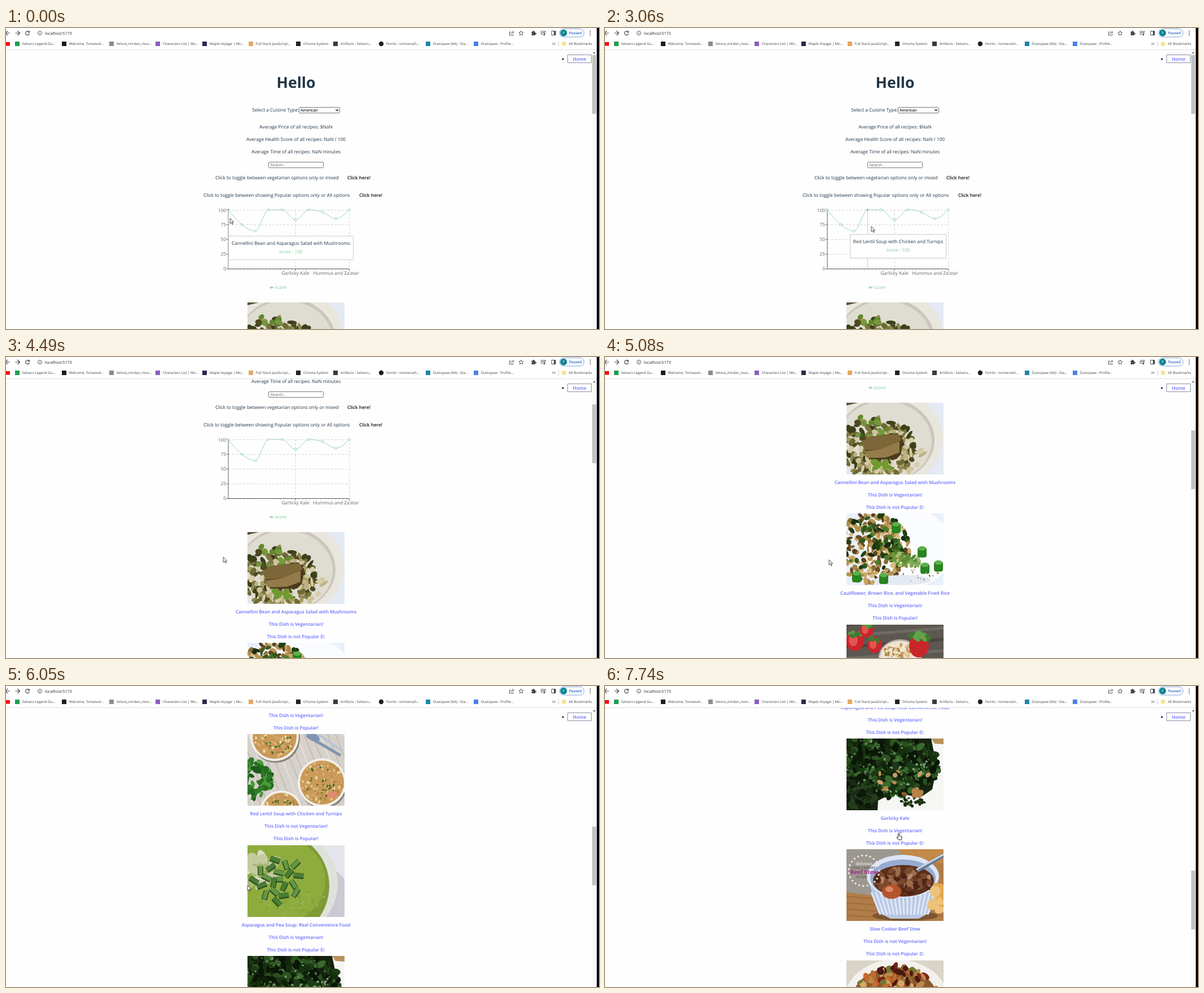
Recreate the animation shown at these times as an HTML page with a canvas. Size 1051x533 px, loop 8000 ms.

```html
<!DOCTYPE html>
<html lang="en">
<head>
<meta charset="utf-8">
<title>Recipes</title>
<style>
html, body { margin: 0; width: 100%; height: 100%; overflow: hidden; background: #fefefe; }
canvas { display: block; }
</style>
</head>
<body>
<canvas id="stage" width="1051" height="533"></canvas>
<script>
const screen2d = document.getElementById('stage').getContext('2d');
let g = screen2d;

const INK = '#213547', LINK = '#646cff', GREEN = '#82ca9d', GREY = '#666', DARK = '#45494d';
const SANS = '"Open Sans", "Noto Sans", sans-serif', ARIAL = '"Liberation Sans", sans-serif';
const LOOP = 8000, MID = 514, TOP = 486, PITCH = 196.4;

// ---------- drawing helpers ----------
function label(str, x, y, color = INK, align = 'center', size = 8.3, weight = 400, face = SANS) {
  g.textRendering = 'geometricPrecision';
  g.font = `${weight} ${size}px ${face}`;
  g.textAlign = align;
  g.fillStyle = color;
  g.fillText(str, x, y + size * .36);
}
function rect(x, y, w, h, fill, stroke, radius = 0) {
  g.beginPath();
  g.roundRect(x, y, w, h, radius);
  if (fill) { g.fillStyle = fill; g.fill(); }
  if (stroke) { g.strokeStyle = stroke; g.lineWidth = 1; g.stroke(); }
}
function line(color, width, ...p) {
  g.beginPath();
  for (let i = 0; i < p.length; i += 2) g.lineTo(p[i], p[i + 1]);
  g.strokeStyle = color; g.lineWidth = width; g.stroke();
}
function poly(color, ...p) {
  g.beginPath();
  for (let i = 0; i < p.length; i += 2) g.lineTo(p[i], p[i + 1]);
  g.fillStyle = color; g.fill();
}
function oval(color, x, y, rx, ry = rx, turn = 0) {
  g.beginPath();
  g.ellipse(x, y, rx, ry, turn, 0, 7);
  g.fillStyle = color; g.fill();
}
function shape(d, x, y, fill, stroke, width = 1) {
  const path = new Path2D(d);
  g.save();
  g.translate(x, y);
  if (fill) { g.fillStyle = fill; g.fill(path); }
  if (stroke) { g.strokeStyle = stroke; g.lineWidth = width; g.stroke(path); }
  g.restore();
}

// ---------- dish pictures ----------
let seed = 1;
const rand = () => (seed = seed * 16807 % 2147483647) / 2147483647;
function scatter(n, x, y, rx, ry, size, ...colors) {
  while (n--) {
    const a = rand() * 7, r = Math.sqrt(rand());
    oval(colors[Math.floor(rand() * colors.length)], x + Math.cos(a) * rx * r, y + Math.sin(a) * ry * r,
      size * (.5 + rand() * .6), size * (.3 + rand() * .4), rand() * 3);
  }
}
function soup(x, y, r) {
  oval('#8b857c', x + 2, y + 3, r);
  oval('#f2f0ec', x, y, r);
  oval('#c99a58', x, y, r - 4);
  scatter(90, x, y, r - 6, r - 6, 3.5, '#dcb67c', '#b98545', '#ead2a4', '#d2a566');
  scatter(28, x, y, r - 12, r - 12, 2.5, '#4f7a2a', '#35601f');
}
const photos = [
  () => {
    rect(0, 0, 172, 127, '#e3eaf3');
    oval('#e9e6de', 75, 62, 96, 86);
    oval('#cbc7bc', 70, 66, 86, 74);
    oval('#dfdcd2', 68, 68, 83, 71);
    poly('#5a5038', 0, 0, 20, 0, 0, 5);
    scatter(210, 56, 80, 66, 54, 8, '#6f6a35', '#8f8850', '#4d4a22', '#a59c60', '#3c4018', '#7d7540');
    scatter(50, 72, 88, 66, 42, 8, '#cfc499', '#bdb284', '#d8cda6');
    scatter(16, 40, 48, 32, 26, 8, '#5f8a2a', '#3f5c1c', '#73983a');
    scatter(5, 58, 113, 18, 8, 10, '#6f9a30');
    poly('#4a3a1c', 28, 74, 42, 60, 90, 54, 101, 66, 96, 92, 88, 100, 40, 100);
    poly('#7d6738', 26, 70, 40, 60, 92, 55, 98, 66, 60, 82, 32, 84);
    poly('#947b49', 32, 86, 60, 82, 94, 68, 94, 88, 70, 97, 36, 98);
  },
  () => {
    rect(0, 0, 172, 127, '#e9f0fa');
    oval('#fafcff', 110, 62, 78, 70);
    scatter(260, 46, 62, 66, 62, 7, '#8a6a35', '#a8854a', '#c9a566', '#6b4d22', '#b5924f', '#5a4220', '#d9bd84');
    scatter(70, 50, 50, 62, 52, 7, '#2f5a1c', '#1e3f12', '#4a7d2a', '#173010');
    scatter(26, 95, 80, 16, 12, 6, '#6f9a3c', '#a6bd6a', '#557f2c');
    oval('#e4e9f2', 100, 118, 50, 9);
    scatter(18, 115, 87, 15, 11, 7, '#5d8c3a', '#9dbf70', '#79a850');
    for (const [x, y] of [[66, 115], [139, 97], [163, 93], [88, 25], [134, 68], [18, 112]]) {
      rect(x - 8, y - 8, 16, 18, '#2a8420', null, 4);
      oval('#5cb04a', x, y - 6, 7, 4);
    }
    scatter(14, 130, 110, 35, 12, 2, '#8a6a45', '#b49a72');
  },
  () => {
    rect(0, 0, 172, 127, '#5c5751');
    for (let i = 0; i < 8; i++) line(i % 2 ? '#6f6a63' : '#4a4540', 5, 0, i * 20, 172, i * 20 - 14);
    for (const [x, y, r] of [[15, 29, 16], [36, 10, 12], [50, 36, 13], [128, 38, 18]]) {
      oval('#c8262b', x, y, r, r * 1.1);
      oval('#e5534f', x - 3, y - 2, r * .5, r * .7);
      scatter(8, x, y - r * .8, r * .7, 4, 6, '#3f7a30', '#5b9a45');
    }
    oval('#b8b2a8', 95, 58, 38, 32);
    rect(58, 55, 74, 80, '#e6d8cf');
    oval('#efe6d8', 95, 56, 35, 27);
    scatter(80, 95, 48, 28, 15, 4, '#c99d5c', '#e0c08a', '#a87a3c', '#f0ddb8');
    scatter(26, 140, 95, 30, 25, 3, '#c9a470', '#a88450');
    oval('#c8262b', 128, 38, 17, 20);
    scatter(12, 128, 21, 17, 6, 9, '#3f7a30', '#63a24a');
  },
  () => {
    rect(0, 0, 172, 127, '#d6d1ca');
    for (let i = 0; i < 16; i++) line(i % 3 ? '#c4beb5' : '#e6e2dc', 2, i * 14 - 40, 0, i * 14 + 10, 127);
    line('#8295ae', 5, 105, 3, 165, 38);
    line('#b7c5d8', 4, 125, 0, 168, 30);
    oval('#7f93b0', 116, 5, 13, 7, .5);
    soup(48, 5, 43);
    soup(132, 86, 43);
    soup(60, 138, 38);
    scatter(80, 12, 78, 32, 34, 8, '#2f7a28', '#1d5a1a', '#479a38', '#246b20');
    oval('#e08a70', 150, 108, 9, 6);
  },
  () => {
    rect(0, 0, 172, 127, '#c9cad2');
    poly('#e4e5ec', 118, 0, 172, 0, 172, 60, 152, 40);
    oval('#dfe2da', 52, 68, 108, 100);
    oval('#7f9a38', 45, 72, 100, 98);
    oval('#8eac3e', 50, 62, 88, 78);
    scatter(24, 24, 48, 30, 30, 15, '#c4cba0', '#a9b874', '#d8dcc4');
    scatter(60, 80, 95, 60, 28, 3, '#82a035', '#98b550');
    for (let i = 0; i < 20; i++) {
      const a = i * 2.4, r = 9 * Math.sqrt(i), x = 54 + Math.cos(a) * r * 1.15, y = 60 + Math.sin(a) * r;
      const dx = 9 * Math.cos(i * 1.7), dy = 8 * Math.sin(i * 1.7);
      line('#2c5220', 10, x - dx, y - dy + 1, x + dx, y + dy + 1);
      line(i % 2 ? '#4b7d34' : '#639646', 7, x - dx, y - dy, x + dx, y + dy);
    }
  },
  () => {
    rect(0, 0, 172, 127, '#f6f6f4');
    poly('#b8925c', 150, 0, 172, 0, 172, 10, 156, 9);
    poly('#16240f', 0, 0, 150, 0, 160, 50, 152, 90, 130, 105, 85, 95, 56, 110, 55, 127, 0, 127);
    scatter(380, 70, 46, 92, 58, 9, '#1c3a16', '#0f2009', '#2b5220', '#16300f', '#3b6a2e', '#0a1607');
    scatter(90, 20, 95, 32, 30, 8, '#1a2c14', '#0d170a', '#24401c');
    scatter(70, 70, 45, 85, 50, 3, '#5f8a55', '#4b7544', '#7d9f78');
    scatter(10, 100, 75, 55, 20, 6, '#b98a4e', '#caa06a');
    scatter(9, 114, 98, 20, 6, 9, '#b5824a', '#d2a875', '#8a5a2c');
    scatter(30, 115, 112, 22, 8, 4, '#2b4a20', '#18300f');
  },
  () => {
    rect(0, 0, 172, 127, '#b07c48');
    poly('#9c9791', 0, 0, 172, 0, 172, 14, 90, 26, 60, 84, 0, 76);
    poly('#c48a48', 90, 0, 172, 0, 172, 24, 120, 26);
    for (let i = 0; i < 5; i++) line('#9a6737', 1.5, 0, 84 + i * 11, 172, 96 + i * 11);
    oval('#7c5630', 104, 118, 58, 9);
    poly('#b9c8e4', 36, 46, 164, 46, 148, 112, 128, 123, 78, 123, 56, 112);
    for (let i = 0; i < 15; i++) line('#dfe8f6', 3, 44 + i * 8, 76, 60 + i * 6, 116);
    oval('#dde6f5', 100, 48, 64, 38);
    oval('#97abd0', 100, 51, 58, 33);
    oval('#5c2f1a', 101, 56, 54, 28);
    scatter(70, 101, 57, 47, 22, 9, '#7a4a30', '#9c6a4c', '#4b2415', '#b58668', '#6a3520');
    oval('#b5532c', 80, 75, 17, 13);
    oval('#d98a62', 76, 71, 7, 5);
    line('#6a7a94', 7, 125, 38, 174, 10);
    line('#cfdaeb', 3, 124, 36, 174, 8);
    scatter(14, 165, 85, 12, 18, 14, '#e0a850', '#eec27a');
    for (let a = 0; a < 6.2; a += .27) oval('#f0ead8', 31 + 27 * Math.cos(a), 38 + 27 * Math.sin(a), 1.7);
    label('delicious', 31, 25, '#fff', 'center', 7, 'italic 400', '"Noto Serif", serif');
    label('slow cooker', 30, 32, '#55504c', 'center', 7.8);
    label('Beef Stew', 31, 40, '#a0207e', 'center', 10, 700, '"Noto Serif", serif');
    label('recipe', 27, 48, '#55504c', 'center', 7);
  },
  () => {
    rect(0, 0, 172, 127, '#d9d3c8');
    oval('#f3f1ec', 88, 70, 92, 72);
    oval('#8a5a2c', 86, 70, 76, 58);
    scatter(220, 86, 68, 74, 58, 9, '#b98a4a', '#7a2418', '#4c1710', '#9a6a34', '#d0a868', '#6f7a34', '#c46a2c');
  },
].map((paint, i) => {
  const sheet = document.createElement('canvas');
  sheet.width = 172;
  sheet.height = 127;
  g = sheet.getContext('2d');
  seed = 77 + i * 991;
  paint();
  g = screen2d;
  return sheet;
});

// ---------- content: title, score, vegetarian, popular ----------
const dishes = [
  ['Cannellini Bean and Asparagus Salad with Mushrooms', 100, 1, 0],
  ['Cauliflower, Brown Rice, and Vegetable Fried Rice', 75, 1, 1],
  ['Berry Banana Breakfast Smoothie', 64, 1, 1],
  ['Red Lentil Soup with Chicken and Turnips', 100, 0, 1],
  ['Asparagus and Pea Soup: Real Convenience Food', 100, 1, 0],
  ['Garlicky Kale', 83, 1, 0],
  ['Slow Cooker Beef Stew', 100, 0, 0],
  ['Red Kidney Bean Jambalaya', 96, 1, 1],
  ['Chicken Fajita Stuffed Bell Pepper', 85, 0, 0],
  ["Hummus and Za'atar", 100, 1, 0],
];
const bookmarks = [
  [20, '#1e9e4f', 'Selvaro Legend Gu...'], [103, '#1d1a18', 'Welcome, Tomasvel...'],
  [187, '#8a8d90', 'Velora_mirdan_moo...'], [269, '#8a5fc0', 'Characters List | Mo...'],
  [352, '#2a2a4a', 'Maple Voyage | Mo...'], [434, '#e5a860', 'Full Stack JavaScript...'],
  [518, '#222', 'Orluma System'], [584, '#3a3a3a', 'Artifacts - Selvaro...'],
  [665, '#1b1f23', 'Fernlo - tomverash...', true], [748, '#1c86a8', 'Dustopaw (NA) - Sta...'],
  [833, '#4a80e8', 'Dustopaw - Profile...'],
];

// ---------- chart ----------
const LEFT = 394, RIGHT = 608.5, BASE = 426.5, STEP = (RIGHT - LEFT) / 9;
const px = i => LEFT + i * STEP;
const py = score => BASE - score * 1.046;
const curve = (() => {
  const ys = dishes.map(d => py(d[1]));
  const rise = ys.slice(1).map((y, i) => y - ys[i]);
  const slope = ys.map((_, i) => {
    const a = rise[i - 1], b = rise[i];
    return (Math.sign(a) + Math.sign(b)) * Math.min(Math.abs(a), Math.abs(b), Math.abs(a + b) / 4);
  });
  slope[0] = (3 * rise[0] - slope[1]) / 2;
  slope[9] = (3 * rise[8] - slope[8]) / 2;
  const path = new Path2D();
  path.moveTo(px(0), ys[0]);
  for (let i = 0; i < 9; i++) path.bezierCurveTo(px(i + 1 / 3), ys[i] + slope[i] / 3,
    px(i + 2 / 3), ys[i + 1] - slope[i + 1] / 3, px(i + 1), ys[i + 1]);
  return path;
})();

function drawChart(active, tipX, tipY) {
  g.setLineDash([3.5, 3]);
  for (const s of [0, 25, 50, 75, 100]) line('#d0d0d0', 1, LEFT, Math.round(py(s)) + .5, RIGHT, Math.round(py(s)) + .5);
  for (const i of [0, 5, 9]) line('#d0d0d0', 1, Math.floor(px(i)) + .5, 322, Math.floor(px(i)) + .5, BASE);
  g.setLineDash([]);
  line(GREY, 1, LEFT, 322, LEFT, BASE, RIGHT, BASE);
  for (const s of [0, 25, 50, 75, 100]) {
    line(GREY, 1, 390.5, py(s), LEFT, py(s));
    label(s, 390, py(s) + (s === 100 ? 1.5 : 0), GREY, 'right');
  }
  for (const i of [5, 9]) line(GREY, 1, px(i), BASE, px(i), BASE + 3.5);
  label('Garlicky Kale', 513, 434, GREY);
  label("Hummus and Za'atar", 585, 434, GREY);
  if (active >= 0) line('#ccc', 1, Math.floor(px(active)) + .5, 322, Math.floor(px(active)) + .5, BASE);
  g.strokeStyle = GREEN;
  g.lineWidth = .8;
  g.stroke(curve);
  dishes.forEach((d, i) => {
    oval(i === active ? GREEN : '#fff', px(i), py(d[1]), 1.8);
    g.strokeStyle = i === active ? '#fff' : GREEN;
    g.stroke();
    if (i === active) oval(GREEN, px(i), py(d[1]), 1.9);
  });
  line(GREEN, 1.1, 467, 459.5, 474.5, 459.5);
  oval('#fff', 470.7, 459.5, 1.4);
  g.strokeStyle = GREEN;
  g.stroke();
  label('score', 476.5, 459, GREEN, 'left');
  if (active < 0) return;
  const [title, score] = dishes[active];
  g.font = `400 8.3px ${SANS}`;
  const w = Math.round(g.measureText(title).width + 12);
  const x = Math.round(Math.max(LEFT, Math.min(tipX, RIGHT - w))), y = Math.round(tipY);
  rect(x + .5, y + .5, w - 1, 42, '#fff', '#ccc');
  label(title, x + w / 2, y + 13);
  label('score : ' + score, x + w / 2, y + 28.5, GREEN);
}

function drawPage(active, tipX, tipY) {
  label('Hello', MID, 96, INK, 'center', 26.7, 700);
  label('Select a Cuisine Type:', 519, 145, INK, 'right');
  rect(519.5, 140.5, 72, 10, '#fff', '#767676', 1);
  label('American', 522, 145.5, '#000', 'left', 7.3, 400, ARIAL);
  line('#000', 1.2, 584.5, 144.2, 586.7, 146.6, 588.9, 144.2);
  label('Average Price of all recipes: $NaN', MID, 175.5);
  label('Average Health Score of all recipes: NaN / 100', MID, 197.5);
  label('Average Time of all recipes: NaN minutes', MID, 219.5);
  rect(465.5, 237.5, 97, 10, '#fff', '#767676', 1);
  label('Search...', 468, 242.5, '#757575', 'left', 7.3, 400, ARIAL);
  label('Click to toggle between vegetarian options only or mixed', 371, 265, INK, 'left');
  label('Click here!', 625.5, 265, '#111', 'center', 8.2, 600);
  label('Click to toggle between showing Popular options only or All options', 350, 296.5, INK, 'left');
  label('Click here!', 646.5, 296.5, '#111', 'center', 8.2, 600);
  drawChart(active, tipX, tipY);
  photos.forEach((photo, i) => {
    const y = Math.round(TOP + i * PITCH), [title, , veg, popular] = dishes[i];
    g.drawImage(photo, 428, y);
    const lines = [title, `This Dish is ${veg ? '' : 'not '}Vegentarian!`, popular ? 'This Dish is Popular!' : 'This Dish is not Popular D:'];
    lines.forEach((s, n) => label(s, MID, y + 141.5 + n * 22, LINK, 'center', 8.2, 600));
  });
}

// ---------- browser frame ----------
function drawBrowser(scroll) {
  rect(1038, 38, 9, 495, '#fafafa');
  rect(1039, 48 + Math.round(scroll * .2027), 7, 104, '#c1c1c1');
  poly('#505050', 1040.5, 45, 1042.5, 42.3, 1044.5, 45);
  oval(INK, 987, 55, 1.7);
  rect(995.5, 47.5, 42, 14, '#fff', '#8c8ca8');
  label('Home', 1016.5, 55, LINK, 'center', 8.3, 600);

  rect(0, 0, 1051, 38, '#fff');
  line('#dcdfe3', 1, 0, 38.5, 1047, 38.5);
  shape('M7 0H-1M3-4L-1 0L3 4', 0, 9, null, DARK, 1.2);
  shape('M-4 0H4M0-4L4 0L0 4', 20.5, 9, null, DARK, 1.2);
  shape('M2.6-2.4A3.5 3.5 0 1 0 3.5 .8M3.4-4V-1.3H.7', 38, 9, null, DARK, 1.2);
  shape('M3.5 0A3.5 3.5 0 1 0-3.5 0A3.5 3.5 0 1 0 3.5 0M0-.5V2M0-2V-1.2', 60, 9, null, DARK, .9);
  label('localhost:5173', 69, 9, '#202124', 'left', 7.1);
  shape('M-1-2H-3.5V4H3V2M-1 2Q-1-1.5 3.5-1.5M1.5-4L4-1.5L1.5 1', 896, 9, null, DARK, .9);
  shape('M0-4L1.2-1.3L4-1L1.9 .9L2.5 3.7L0 2.2L-2.5 3.7L-1.9 .9L-4-1L-1.2-1.3Z', 913, 9, null, DARK, .9);
  shape('M-3.5-2.5H-1.2A1.3 1.3 0 1 1 1.2-2.5H3V0A1.3 1.3 0 1 1 3 2V4H-3.5V2A1.2 1.2 0 0 0-3.5-.3Z', 935, 9, DARK);
  shape('M-4.5-3H2M-4.5-.5H2M-4.5 2H-1M3 2.5V-3H5', 952, 9, null, DARK, 1.1);
  oval(DARK, 953.8, 11.8, 1.5);
  rect(967, 5.5, 7, 7, null, DARK);
  rect(971, 5.5, 3, 7, DARK);
  rect(981, 1.5, 43.5, 14.5, '#fff', '#7fa6dc', 7.2);
  oval('#00838f', 988.3, 8.8, 6);
  label('P', 988.3, 8.8, '#fff', 'center', 6.5);
  label('Paused', 1009, 9, '#1a5fc4', 'center', 6.3, 600);
  for (const y of [5.5, 9, 12.5]) oval(DARK, 1035.5, y, .9);

  rect(-3, 25, 10, 6.5, '#f00');
  for (const [x, color, name, round] of bookmarks) {
    if (round) oval(color, x, 28, 4.2); else rect(x - 4, 24, 8, 8, color);
    label(name, x + 8.8, 28, '#3c4043', 'left', 6.2);
  }
  shape('M-2-2L0 0L-2 2M1-2L3 0L1 2', 970.5, 28, null, DARK, .9);
  line('#c8d4ea', 1, 979.5, 23, 979.5, 33);
  rect(985.5, 24.5, 7, 7, '#fbe08a', null, 1);
  label('All Bookmarks', 997.5, 28, '#3c4043', 'left', 6.2);
  rect(1047, 0, 4, 533, '#000');
}

function drawPointer(x, y, hand) {
  if (hand) {
    shape('M2 7V1.2Q3-.4 4 1.2V5L8 6Q8.8 6.4 8.6 8L7.8 12.5H2.8L-.6 8.4Q-.4 6.8 1 7.6L2 8.4Z', x, y, '#fff', '#111', .9);
  } else {
    shape('M0 0V9.2L2.2 7.2L3.8 10.6L5.2 10L3.7 6.7H6.6Z', x, y, '#fff', '#222', .8);
  }
}

// ---------- motion ----------
const pointerKeys = [[0, 397, 337], [400, 420, 345], [700, 436, 350], [1050, 404, 345], [1200, 405, 344],
  [1582, 485, 344], [1710, 522, 343], [2140, 590, 345], [2540, 643, 350], [3300, 387, 352], [3420, 379, 352],
  [4080, 377, 351], [5080, 397, 359], [6050, 428, 353], [6700, 451, 351], [7740, 517.5, 260]];
const scrollKeys = [[3690, 0], [4080, 110], [4370, 130], [5080, 405], [6050, 990], [6700, 1223], [7740, 1375]];
const tipKeys = [[0, 394, 368], [400, 394, 380], [1100, 394, 362], [1582, 394, 345], [1710, 439, 343],
  [1860, 500, 350], [2140, 480, 356], [3000, 440, 365], [3300, 400, 365]];

const beats = [0, 120, 1050, 1200, 1710, 1860, 2140, 2290, 3300, 3420, 4080, 4250, 4370, 4490,
  5080, 5200, 5490, 5610, 6050, 6190, 6550, 6700, 6870, 7740, LOOP];

function hold(t) {
  const i = beats.findIndex(b => b > t), a = beats[i - 1], span = beats[i] - a;
  const step = span / Math.max(1, Math.round(span / 132));
  return a + step * Math.floor((t - a) / step);
}
function track(keys, t) {
  const i = keys.findIndex(k => k[0] > t);
  if (i < 0) return keys[keys.length - 1].slice(1);
  if (i === 0) return keys[0].slice(1);
  const a = keys[i - 1], b = keys[i], u = (t - a[0]) / (b[0] - a[0]);
  return a.slice(1).map((v, n) => v + (b[n + 1] - v) * u);
}

function frame(now) {
  const t = hold(now % LOOP);
  const [x, y] = track(pointerKeys, t), [tipX, tipY] = track(tipKeys, t);
  const scroll = Math.round(track(scrollKeys, t)[0]);
  const inside = t < 3420 && x >= LEFT && x <= RIGHT;
  rect(0, 0, 1051, 533, '#fefefe');
  g.save();
  g.translate(0, -scroll);
  drawPage(inside ? Math.round((x - LEFT) / STEP) : -1, tipX, tipY);
  g.restore();
  drawBrowser(scroll);
  drawPointer(x, y, t > 7300);
  requestAnimationFrame(frame);
}
requestAnimationFrame(frame);
</script>
</body>
</html>
```
